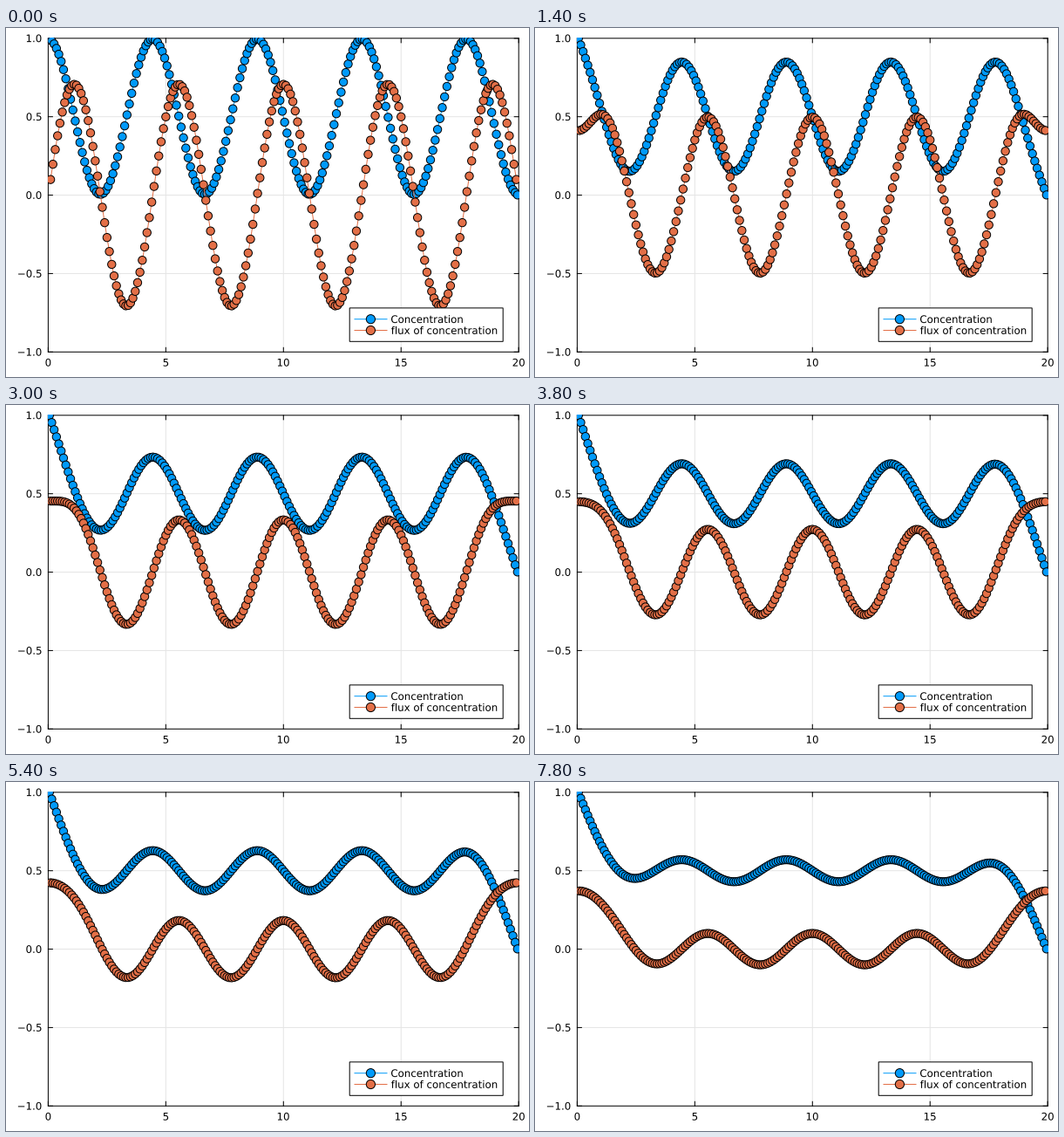
Animation, 600 px wide and 400 px high, one loop 8 s. Source, as a matplotlib script:

```python
import numpy as np
import matplotlib.pyplot as plt
from matplotlib.animation import FuncAnimation
from matplotlib.patches import Circle, PathPatch, Rectangle
from matplotlib.path import Path
from matplotlib.textpath import TextPath

W, H, DPI = 600, 400, 100
LEFT, RIGHT, TOP, BOTTOM = 48.4, 588.19, 11.81, 371.3
FRAMES, INTERVAL, STEPS = 40, 200, 5
BLUE, ORANGE, GRID = "#009afa", "#e36f47", "#e5e5e5"
PT = 72 / DPI  # points per pixel
DOT, KEY_DOT = 9.3, 10.2
FONT = 11.8

# 1D diffusion, explicit scheme with fixed end cells
LX, NX, D = 20.0, 200, 1.0
DX = LX / NX
DT = DX**2 / D / 2
xc = (np.arange(NX) + 0.5) * DX
xq = xc[:-1] + DX / 2

plt.rcParams["path.simplify"] = False


def simulate():
    c = 0.5 * np.cos(9 * np.pi * xc / LX) + 0.5
    states = []
    for step in range((FRAMES - 1) * STEPS + 1):
        q = -D * np.diff(c) / DX
        c[1:-1] -= DT * np.diff(q) / DX
        if step % STEPS == 0:
            states.append((c.copy(), q))
    return states


def px(x):
    return LEFT + (RIGHT - LEFT) * np.asarray(x) / LX


def py(y):
    return TOP + (BOTTOM - TOP) * (1 - np.asarray(y)) / 2


fig = plt.figure(figsize=(W / DPI, H / DPI), dpi=DPI, facecolor="white")
ax = fig.add_axes([0, 0, 1, 1])
ax.set_xlim(0, W)
ax.set_ylim(H, 0)
ax.axis("off")


def line(xs, ys, color="black", z=1, **kw):
    return ax.plot(xs, ys, color=color, lw=PT, zorder=z, snap=False, **kw)[0]


def text(x, y, s, align=0.0, z=1):
    """Outline text; align 0, 0.5 or 1 puts its left, middle or right at x."""
    path = TextPath((0, 0), s, size=FONT, prop={"family": "DejaVu Sans"})
    box = path.get_extents()
    shift = x - box.x0 - align * box.width
    verts = path.vertices * [1, -1] + [shift, y + 0.365 * FONT]
    ax.add_patch(PathPatch(Path(verts, path.codes), facecolor="black", lw=0,
                           zorder=z, snap=False))


class Series:
    def __init__(self, xs, color, z):
        self.xs = xs
        self.line = line(xs, 0 * xs, color, z)
        # per-point sizes keep the dots at subpixel positions
        self.dots = ax.scatter(xs, 0 * xs, s=np.full(len(xs), (DOT * PT) ** 2),
                               facecolor=color, edgecolor="black",
                               linewidth=PT, zorder=z + 0.5, snap=False)
        for part in (self.line, self.dots):
            part.set_clip_path(Rectangle(
                (LEFT - 0.5, TOP - 0.5), RIGHT - LEFT + 1, BOTTOM - TOP + 1,
                transform=ax.transData))

    def move(self, ys):
        self.line.set_ydata(ys)
        self.dots.set_offsets(np.column_stack([self.xs, ys]))


def draw_frame():
    tick = 5
    for v in range(0, 21, 5):
        x = px(v)
        if 0 < v < 20:
            line([x, x], [TOP, BOTTOM], GRID, z=0)
        line([x, x], [BOTTOM, BOTTOM - tick])
        line([x, x], [TOP, TOP + tick])
        text(x, 383.3, str(v), 0.5)
    for v in np.arange(-1, 1.1, 0.5):
        y = py(v)
        if abs(v) < 1:
            line([LEFT, RIGHT], [y, y], GRID, z=0)
        line([LEFT, LEFT + tick], [y, y])
        line([RIGHT, RIGHT - tick], [y, y])
        text(40.5, y, f"{v:.1f}".replace("-", "\u2212"), 1)
    ax.add_patch(Rectangle((LEFT, TOP), RIGHT - LEFT, BOTTOM - TOP, fill=False,
                           edgecolor="black", lw=PT, zorder=1, snap=False))


def draw_legend():
    row = 12.8
    right, bottom = RIGHT - 18, BOTTOM - 12
    ax.add_patch(Rectangle((394.2, bottom - 3 * row), right - 394.2, 3 * row,
                           facecolor="white", edgecolor="black", lw=PT,
                           zorder=5, snap=False))
    rows = [(2, BLUE, "Concentration"), (1, ORANGE, "flux of concentration")]
    for i, color, label in rows:
        y = bottom - i * row
        line([400, 437], [y, y], color, z=6)
        ax.add_patch(Circle((418.4, y), KEY_DOT / 2, facecolor=color,
                            edgecolor="black", lw=PT, zorder=7, snap=False))
        text(442, y, label, z=7)


draw_frame()
draw_legend()
states = simulate()
conc = Series(px(xc), BLUE, 3)
flux = Series(px(xq), ORANGE, 4)


def update(i):
    c, q = states[i]
    conc.move(py(c))
    flux.move(py(q))


update(0)
anim = FuncAnimation(fig, update, frames=FRAMES, interval=INTERVAL,
                     repeat=True, repeat_delay=0, blit=False)
plt.show()
```
